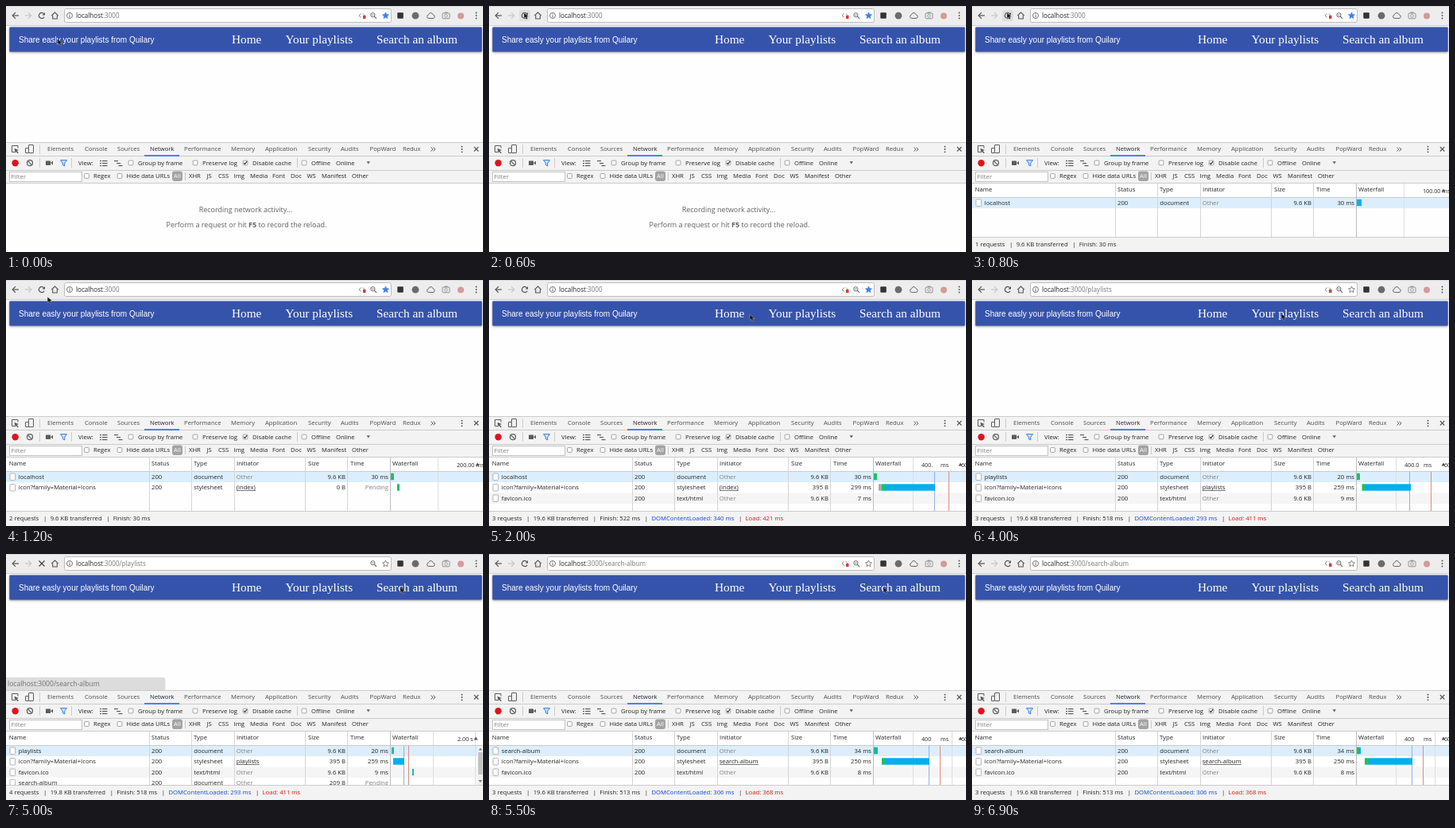
Write an HTML page with a canvas that moves like this. It is 600 px wide and 309 px high and loops after 7.1 s.

```html
<!DOCTYPE html>
<html lang="en">
<head>
<meta charset="utf-8">
<title>Network panel</title>
<style>
html, body { margin: 0; width: 100%; height: 100%; overflow: hidden; background: #fff; }
canvas { display: block; width: 600px; height: 309px; }
</style>
</head>
<body>
<canvas id="stage" width="600" height="309"></canvas>
<script>
const g = document.getElementById("stage").getContext("2d");
const LOOP = 7100, STEP = 100;
const UI = '"Open Sans", "Noto Sans", sans-serif';
const BLUE = "#06aef0", GREEN = "#1fbf6c", TEAL = "#17c3a6";
const GRID = "#dedede", EDGE = "#cbcbcb", PANEL = "#f3f3f3";
const DOM = "#8fb0e8", LOAD = "#e08a80", INK = "#242424", ICON = "#5c5c5c", FAINT = "#808080";

// Drawing helpers
function box(x, y, w, h, fill) {
  g.fillStyle = fill;
  g.fillRect(x, y, w, h);
}

function round(x, y, w, h, r, fill, stroke) {
  g.beginPath();
  g.roundRect(x, y, w, h, r);
  paint(fill, stroke);
}

function paint(fill, stroke, width = 1) {
  if (fill) { g.fillStyle = fill; g.fill(); }
  if (stroke) { g.strokeStyle = stroke; g.lineWidth = width; g.stroke(); }
}

function disc(x, y, r, fill, stroke, width) {
  g.beginPath();
  g.arc(x, y, r, 0, 7);
  paint(fill, stroke, width);
}

function poly(points, fill, stroke, width, close = !!fill) {
  g.beginPath();
  for (let i = 0; i < points.length; i += 2) g.lineTo(points[i], points[i + 1]);
  if (close) g.closePath();
  paint(fill, stroke, width);
}

function text(s, x, y, { size = 7.7, color = INK, align = "left", font = UI, weight = "" } = {}) {
  g.font = `${weight} ${size}px ${font}`;
  g.fillStyle = color;
  g.textAlign = align;
  g.fillText(s, x, y);
  return g.measureText(s).width;
}

// Network log contents
const doc = (name, time) => [name, "document", "Other", "9.6 KB", time];
const css = (from, time) => ["icon?family=Material+Icons", "stylesheet", from, time === "Pending" ? "0 B" : "395 B", time];
const ico = time => ["favicon.ico", "text/html", "Other", "9.6 KB", time];
const foot = (n, size, finish, dom, load) => [
  [`${n} requests`], [`${size} KB transferred`], [`Finish: ${finish} ms`],
  ...(dom ? [[`DOMContentLoaded: ${dom} ms`, "#0b45e0"], [`Load: ${load} ms`, "#e01212"]] : [])
];

const first = (name, ms) => ({
  rows: [doc(name, `${ms} ms`)], foot: foot(1, "9.6", ms),
  bars: [[0, 484, 6, BLUE]], lines: [[543.5, GRID]], labels: [["100.00 ms", 567]]
});
const early = (name, ms, from) => ({
  rows: [doc(name, `${ms} ms`), css(from, "Pending")], foot: foot(2, "9.6", ms),
  bars: [[0, 484, 4, GREEN], [1, 492, 3, GREEN]], lines: [[543.5, GRID]], labels: [["200.00 ms", 567]]
});
const scale = mark => [[mark, 544], ["ms", 568], ["600", 594]];
const HOME = {
  rows: [doc("localhost", "30 ms"), css("(index)", "299 ms"), ico("7 ms")],
  foot: foot(3, "19.6", 522, 340, 421), labels: scale("400."),
  bars: [[0, 484, 4, GREEN], [1, 490, 4, "#aaa"], [1, 494, 5, GREEN], [1, 498, 63, BLUE]],
  lines: [[533.5, GRID], [560.5, DOM], [578.5, LOAD]]
};
const LISTS = {
  rows: [doc("playlists", "20 ms"), css("playlists", "259 ms"), ico("9 ms")],
  foot: foot(3, "19.6", 518, 293, 411), labels: scale("400.0"),
  bars: [[0, 484, 4, GREEN], [1, 490.5, 5, GREEN], [1, 495, 57, BLUE]],
  lines: [[533.5, GRID], [550.5, DOM], [577.5, LOAD]]
};
const WAITING = {
  rows: [...LISTS.rows, ["search-album", "document", "Other", "209 B", "Pending"]],
  foot: foot(4, "19.8", 518, 293, 411), labels: [["2.00 s", 568]],
  bars: [[0, 485, 3, TEAL], [1, 487, 14, BLUE], [2, 511, 2, TEAL]],
  lines: [[500.5, DOM], [506.5, LOAD], [537.5, GRID], [590.5, GRID]]
};
const SEARCH = {
  rows: [doc("search-album", "34 ms"), css("search-album", "250 ms"), ico("8 ms")],
  foot: foot(3, "19.6", 513, 306, 368), labels: scale("400"),
  bars: [[0, 484, 5, BLUE], [0, 484, 3, GREEN], [1, 494, 5, GREEN], [1, 499, 55, BLUE]],
  lines: [[533.5, GRID], [553.5, DOM], [567.5, LOAD], [582.5, GRID]]
};

// Each entry changes part of the state from its time on
const SCENES = [
  [0, { path: "", star: true, code: true, busy: false, bubble: "", rows: null, scroll: false }],
  [700, first("localhost", 30)],
  [1000, early("localhost", 30, "(index)")],
  [1300, HOME],
  [2500, { bubble: "/playlists" }],
  [2700, { busy: true, rows: null }],
  [2800, { path: "/playlists", star: false, ...first("playlists", 20) }],
  [3000, early("playlists", 20, "playlists")],
  [3300, LISTS],
  [3500, { busy: false, bubble: "" }],
  [4800, { bubble: "/search-album" }],
  [4900, { busy: true, code: false, scroll: true, ...WAITING }],
  [5100, { path: "/search-album", code: true, scroll: false, ...first("search-album", 34) }],
  [5300, early("search-album", 34, "search-album")],
  [5400, SEARCH],
  [5500, { busy: false, bubble: "" }]
];

// Pointer path: time, x, y
const PATH = [
  [0, 67, 46], [100, 66, 44], [500, 46, 13], [900, 46, 13], [1600, 65, 43], [2000, 330, 48],
  [2400, 404, 49], [2600, 376, 47], [3900, 376, 47], [4700, 497, 45], [4900, 498, 46],
  [6500, 498, 46], [6800, 541, 46]
];

function pointerAt(t) {
  const i = PATH.findIndex(p => p[0] > t);
  if (i < 0) return PATH[PATH.length - 1].slice(1);
  const [a, b] = [PATH[i - 1], PATH[i]];
  const k = (t - a[0]) / (b[0] - a[0]);
  return [a[1] + (b[1] - a[1]) * k, a[2] + (b[2] - a[2]) * k];
}

function pointer(x, y) {
  g.save();
  g.translate(x - 2, y - 4.5);
  poly([0, 0, 0, 7, 1.8, 5.6, 3, 8.3, 4.6, 7.6, 3.4, 5, 6, 5], "#161616", "rgba(255,255,255,.5)", 0.6);
  g.restore();
}

function star(x, y, blue) {
  const pts = [];
  for (let i = 0; i < 10; i++) {
    const r = i % 2 ? 1.9 : 4.2, a = -Math.PI / 2 + i * Math.PI / 5;
    pts.push(x + r * Math.cos(a), y + r * Math.sin(a));
  }
  poly(pts, blue ? "#3f7fe8" : null, blue ? "#3f7fe8" : "#666", 0.8, true);
}

function browserBar(s, hover) {
  box(0, 0, 600, 25, "#eeedee");
  box(0, 0, 600, 1, "#dcdcdc");
  box(0, 24, 600, 1, "#d0d0d0");
  for (const [x, dir, color] of [[12, -1, "#555"], [28, 1, "#c8c8c8"]]) {
    poly([x - 4 * dir, 12, x + 4 * dir, 12], null, color, 1.2);
    poly([x, 8.2, x + 3.8 * dir, 12, x, 15.8], null, color, 1.2);
  }
  if (hover) round(38, 5, 14, 14, 2, "#dfdfdf");
  if (s.busy) {
    poly([41.5, 8.5, 48.5, 15.5], null, "#444", 1.3);
    poly([48.5, 8.5, 41.5, 15.5], null, "#444", 1.3);
  } else {
    g.beginPath();
    g.arc(45, 12, 3.5, 0.5, 5.6);
    paint(null, "#555", 1.2);
    poly([49, 8, 49, 11.4, 45.6, 11.4], "#555");
  }
  poly([57.2, 12.2, 61.5, 8, 65.8, 12.2], null, "#555", 1.1);
  poly([58.7, 11.5, 58.7, 16, 64.3, 16, 64.3, 11.5], null, "#555", 1.1);

  round(73.5, 3.5, 411, 17, 2, "#fff", "#bcbcbc");
  disc(80, 12, 3.5, null, "#666", 0.9);
  box(79.6, 11.4, 1, 2.8, "#666");
  box(79.6, 9.7, 1, 1, "#666");
  const w = text("localhost", 88, 15, { size: 8.1 });
  text(":3000" + s.path, 88 + w, 15, { size: 8.1, color: "#777" });

  if (s.code) {
    poly([446.5, 9.5, 444.3, 12, 446.5, 14.5], null, "#777", 0.9);
    poly([449, 9.5, 451.3, 12], null, "#777", 0.9);
    box(449, 12, 3.5, 4, "#d83a3a");
  }
  disc(461.4, 11.2, 2.6, null, "#666", 1);
  poly([463.4, 13.2, 466, 15.8], null, "#666", 1.2);
  poly([460.2, 11.2, 462.6, 11.2], null, "#666", 0.8);
  star(477.5, 12.2, s.star);

  round(492.3, 8.3, 7.5, 7.5, 1, "#333");
  disc(515, 12.2, 4.4, "#6b6b6b");
  g.beginPath();
  g.arc(531.8, 13.3, 2.2, 1.57, 4.5);
  g.arc(534.3, 11.4, 2.8, 3.5, 5.8);
  g.arc(537, 13.3, 2.2, 4.9, 1.57);
  g.closePath();
  paint(null, "#666", 1);
  round(549, 9, 9, 6.8, 1, null, "#929292");
  box(551.5, 7.6, 4, 1.4, "#929292");
  disc(553.5, 12.4, 1.8, null, "#929292", 0.9);
  disc(572, 12.5, 4, "#d59a9a");
  for (const y of [8.5, 12, 15.5]) disc(591.5, y, 0.95, "#555");
}

function page() {
  box(0, 25, 600, 146, "#fefefe");
  g.save();
  g.shadowColor = "rgba(0,0,0,.4)";
  g.shadowBlur = 3;
  g.shadowOffsetY = 1;
  round(4.3, 26.4, 594.4, 31, 1, "#3653ab");
  g.restore();
  text("Share easly your playlists from Quilary", 16, 45.5, { size: 10, color: "#fff", font: '"Liberation Sans", sans-serif' });
  for (const [s, x] of [["Home", 284], ["Your playlists", 351.5], ["Search an album", 466]])
    text(s, x, 47, { size: 15.3, color: "#fff", font: '"Liberation Serif", serif' });
}

function check(x, y, on) {
  round(x - 2.9, y - 2.9, 5.8, 5.8, 1, "#fff", "#a2a2a2");
  if (on) poly([x - 1.7, y, x - 0.4, y + 1.6, x + 2.2, y - 2], null, "#333", 1.2);
}

function toolbars() {
  box(0, 171, 600, 52, PANEL);
  for (const y of [171, 188, 206, 222]) box(0, y, 600, 1, EDGE);

  poly([11, 183.5, 7.5, 183.5, 7.5, 175.5, 15, 175.5, 15, 178.5], null, ICON, 1);
  poly([10.5, 178.8, 16, 181, 13.6, 182, 15.8, 184.3, 14.8, 185.2, 12.6, 183, 11.7, 185], ICON);
  round(28.5, 174.5, 6, 10, 0.5, null, ICON);
  round(24.5, 178.5, 4, 6, 0.5, PANEL, ICON);
  box(42, 174, 1, 12, EDGE);
  const tabs = [["Elements", 52], ["Console", 99], ["Sources", 140], ["Network", 181], ["Performance", 224],
    ["Memory", 283], ["Application", 326], ["Security", 380], ["Audits", 421], ["PopWard", 457.5], ["Redux", 499]];
  for (const [s, x] of tabs) text(s, x, 182.4, { color: s === "Network" ? INK : "#4c4c4c" });
  box(174, 187, 44, 2, "#4285f4");
  for (const x of [534.5, 537.5]) poly([x, 177.5, x + 2.4, 180, x, 182.5], null, ICON, 1);
  for (const y of [176.7, 180, 183.3]) disc(573.5, y, 0.9, "#444");
  poly([588.8, 177, 594.3, 182.5], null, "#555", 1.1);
  poly([594.3, 177, 588.8, 182.5], null, "#555", 1.1);

  disc(11.6, 197.2, 4.2, "#e0141c");
  disc(30, 197.2, 3.5, null, ICON, 1.2);
  poly([27.6, 194.8, 32.4, 199.6], null, ICON, 1.2);
  box(42, 191, 1, 12, EDGE);
  round(50, 194.5, 6, 5.5, 0.5, ICON);
  poly([56, 197.2, 59, 194.8, 59, 199.6], ICON);
  poly([68.5, 193.7, 76.5, 193.7, 73.7, 197.2, 73.7, 201, 71.3, 199.6, 71.3, 197.2], "#d4e3fb", "#2f78e8", 1);
  box(82, 191, 1, 12, EDGE);
  text("View:", 91, 199.7);
  for (const y of [194, 197, 200]) {
    box(118, y, 2, 1.2, ICON);
    box(121, y, 6.5, 1.2, ICON);
  }
  box(136, 194, 5, 1.2, ICON);
  box(139, 197, 5, 1.2, ICON);
  box(141.5, 200, 5, 1.2, ICON);
  const opts = [["Group by frame", 157], ["Preserve log", 238], ["Disable cache", 301], ["Offline", 375]];
  for (const [s, x] of opts) {
    check(x, 197, s === "Disable cache");
    text(s, x + 9, 199.7);
  }
  box(366, 191, 1, 12, EDGE);
  text("Online", 415, 199.7);
  poly([453.5, 195.3, 458, 195.3, 455.8, 198.5], "#666");

  box(4.5, 208.5, 91, 12, "#fff");
  g.strokeStyle = "#c2c2c2";
  g.lineWidth = 1;
  g.strokeRect(4.5, 208.5, 91, 12);
  text("Filter", 6.5, 217, { size: 8, color: FAINT });
  check(101.5, 213.5);
  text("Regex", 110, 216.4);
  check(143, 213.5);
  text("Hide data URLs", 151.5, 216.4);
  round(209, 207.6, 13, 12.4, 3, "#a3a3a3");
  text("All", 215.5, 216.4, { color: "#fff", align: "center" });
  box(225, 209, 1, 10, EDGE);
  const kinds = [["XHR", 230], ["JS", 252.5], ["CSS", 267], ["Img", 286.5], ["Media", 307], ["Font", 335],
    ["Doc", 358], ["WS", 378.5], ["Manifest", 397], ["Other", 435]];
  for (const [s, x] of kinds) text(s, x, 216.4);
}

function emptyLog() {
  const o = { size: 9, color: "#606060" };
  text("Recording network activity…", 301.5, 259.3, { ...o, align: "center" });
  let x = 201.5;
  x += text("Perform a request or hit ", x, 277.7, o);
  x += text("F5", x, 277.7, { ...o, weight: "bold" });
  text(" to record the reload.", x, 277.7, o);
}

function rowLine(row, i) {
  const y = 240.5 + i * 13.5, base = y + 9;
  const [name, type, from, size, time] = row;
  box(0, y, 600, 13.5, i === 0 ? "#dceefd" : i % 2 ? "#fff" : "#f5f5f5");
  round(5, y + 2.4, 6.6, 8.6, 1, "#fff", "#b3b3b3");
  text(name, 15.7, base);
  text("200", 183, base);
  text(type, 236.3, base);
  const plain = from === "Other";
  const w = text(from, 289.7, base, { color: plain ? FAINT : INK });
  if (!plain) box(290, Math.round(base + 1), w, 0.8, "#555");
  text(size, 427, base, { align: "right" });
  text(time, 481, base, { align: "right", color: time === "Pending" ? FAINT : INK });
}

function log(s) {
  s.rows.forEach(rowLine);
  box(0, 223, 600, 17, "#fff");
  for (const [h, x] of [["Name", 3.7], ["Status", 183], ["Type", 236], ["Initiator", 290], ["Size", 380], ["Time", 433], ["Waterfall", 486]])
    text(h, x, 233.4);
  for (const [x, color] of s.lines) box(x - 0.5, color === GRID ? 223 : 240, 1, 68, color);
  for (const [r, x, w, color] of s.bars) box(x, 242.8 + r * 13.5, w, 8.4, color);
  for (const [label, x] of s.labels) text(label, x, 234.6, { size: 7.2 });
  const tip = s.scroll ? 591 : 593;
  poly([tip - 2.5, 233.5, tip + 2.5, 233.5, tip, 229.5], "#555");
  box(0, 240, 600, 1, EDGE);
  for (const x of [180, 233, 287, 376, 429]) box(x, 223, 1, 68, "#d5d5d5");
  box(483, 223, 1, 68, "#bdbdbd");
  if (s.scroll) {
    box(593, 241, 7, 50, "#f1f1f1");
    box(594, 249, 5.5, 28, "#c1c1c1");
    poly([594.3, 246.5, 599, 246.5, 596.7, 243.5], "#777");
    poly([594.3, 284, 599, 284, 596.7, 287], "#777");
  }

  box(0, 290, 600, 19, PANEL);
  box(0, 290, 600, 1, EDGE);
  let x = 4;
  s.foot.forEach(([part, color], i) => {
    if (i) {
      text("|", x + 5.6, 301.7);
      x += 14.2;
    }
    x += text(part, x, 301.7, { color });
  });
}

function draw(t) {
  const s = Object.assign({}, ...SCENES.filter(e => e[0] <= t).map(e => e[1]));
  const [x, y] = pointerAt(t);
  box(0, 0, 600, 309, "#fefefe");
  browserBar(s, x < 53 && y < 20);
  page();
  toolbars();
  if (s.rows) log(s);
  else emptyLog();
  if (s.bubble) {
    g.beginPath();
    g.roundRect(0, 155, 200.5, 16, [0, 3, 0, 0]);
    paint("#dcdcdc");
    text("localhost:3000" + s.bubble, 2, 166.3, { size: 8.6, color: "#707070" });
  }
  if (t < 6900) pointer(x, y);
}

const start = performance.now();
function tick() {
  const t = (performance.now() - start) % LOOP;
  draw(Math.floor(t / STEP) * STEP);
  requestAnimationFrame(tick);
}
tick();
</script>
</body>
</html>
```
